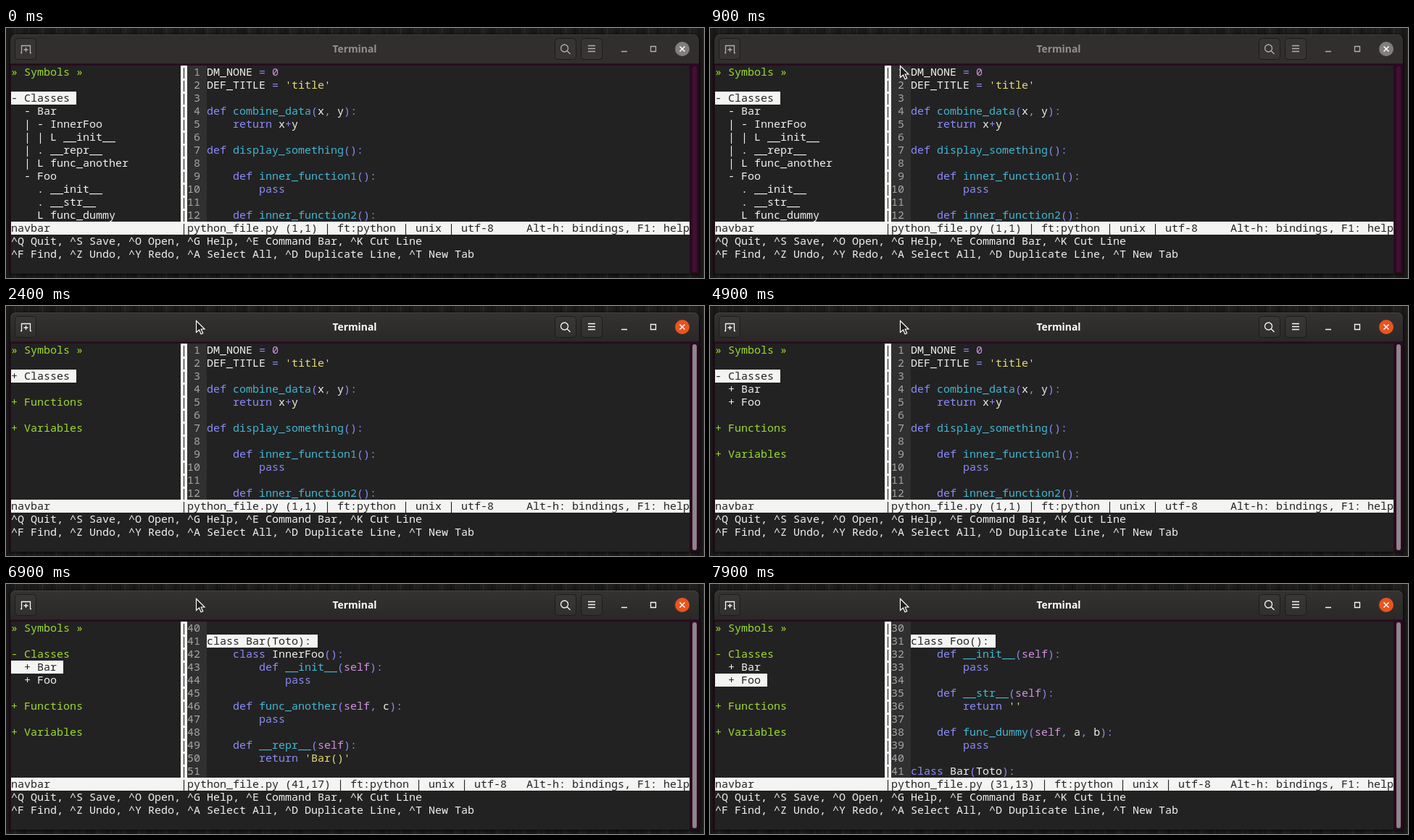
Animation of 963x346 px, one loop 8000 ms. Source, as an HTML page:

```html
<!DOCTYPE html>
<html lang="en">
<head>
<meta charset="utf-8">
<title>Terminal</title>
<style>
html, body { margin: 0; width: 100%; height: 100%; overflow: hidden; }
body {
  position: relative;
  background:
    repeating-linear-gradient(90deg, #0000 0 5px, #0003 5px 7px, #0000 7px 12px, #fff1 12px 13px, #0000 13px 19px),
    repeating-linear-gradient(91deg, #1b1a19 0 11px, #201f1e 15px 23px, #1b1a19 29px);
}
#win, #win div, svg { position: absolute; }
#win { left: 0; top: 0; width: 963px; height: 346px; }
#frame {
  left: 6px; top: 9px; width: 950px; height: 331px; border-radius: 8px 8px 0 0;
  background: #2b0a20; box-shadow: 0 1px 4px 1px #0009;
}
.bar { left: 6px; top: 9px; width: 950px; height: 41px; border-radius: 8px 8px 0 0; box-shadow: inset 0 1px #ffffff14, inset 0 -1px #1b1a1a; }
#dim { background: #302f2e; }
#lit { background: linear-gradient(#353331, #2a2827); }
#title {
  left: 381px; top: 19px; width: 200px; text-align: center;
  font: bold 13.9px/20px "Open Sans", "Noto Sans", sans-serif;
}
#screen { left: 7px; top: 52px; width: 936px; height: 288px; background: #222; }
#thumb { left: 947px; top: 53px; width: 6px; height: 285px; border-radius: 3px; }
.row {
  height: 18px; white-space: pre; color: #f0f0ee;
  font: 15px/16px "Noto Sans Mono", "DejaVu Sans Mono", monospace;
  font-variant-ligatures: none;
}
#win .inv { background: #f4f4f2; color: #222; }
.green { color: #9bdc2c; }
.num { color: #a6a6a4; }
.key { color: #8b8bfa; }
.fn { color: #42b7d3; }
.lit { color: #d491e2; }
.str { color: #e6db74; }
svg { left: 0; top: 0; }
</style>
</head>
<body>
<div id="win">
  <div id="frame"></div>
  <div class="bar" id="dim"></div>
  <div class="bar" id="lit"></div>
  <div id="title">Terminal</div>
  <div id="screen"></div>
  <div id="thumb"></div>
  <svg width="963" height="346" fill="none">
    <g fill="#ffffff08" stroke="#1d1c1b">
      <rect x="12.5" y="14.5" width="29" height="29" rx="4"/>
      <rect x="757.5" y="14.5" width="29" height="29" rx="4"/>
      <rect x="793.5" y="14.5" width="29" height="29" rx="4"/>
    </g>
    <circle id="close" cx="933" cy="29" r="10"/>
    <path d="M929.5 25.5l7 7m0-7l-7 7" stroke="#fff" stroke-width="1.5"/>
    <g id="icons" stroke-width="1.3">
      <path d="M20 34.5H21.5V24.5H33.5V34.5H35M27.5 27v6m-3-3h6"/>
      <circle cx="770.5" cy="28" r="5"/>
      <path d="M774 31.5l4.5 4.5M803 24.5h10m-10 4h10m-10 4h10M849 32.5h8M889.5 25.5h7v7h-7z"/>
    </g>
    <path id="mouse" d="M0 0V16L4 12.5L6.5 18.3L9.2 17.2L6.7 11.5H11.5Z" fill="#1c1c1c" stroke="#fff" stroke-width="1.2"/>
  </svg>
</div>
<script>
const LOOP = 8000;
const $ = id => document.getElementById(id);
const screenEl = $("screen");

function group() {
  return screenEl.appendChild(document.createElement("div"));
}

// Text on a grid of 9 x 18 px cells
function put(parent, col, row, html, cls = "", cols = 0) {
  const el = document.createElement("div");
  el.className = "row " + cls;
  el.style.left = col * 9 + "px";
  el.style.top = row * 18 + "px";
  if (cols) el.style.width = cols * 9 + "px";
  el.innerHTML = html;
  parent.append(el);
  return el;
}

function paint(line) {
  let prev = "";
  return line.replace(/'[^']*'|\w+|[^\w\s']/g, tok => {
    let cls = "";
    if (tok[0] === "'") cls = "str";
    else if (/^(def|class|return|pass)$|^\W/.test(tok)) cls = "key";
    else if (/^(self|\d+)$/.test(tok)) cls = "lit";
    else if (prev === "def") cls = "fn";
    prev = tok;
    return cls ? `<span class="${cls}">${tok}</span>` : tok;
  });
}

function nav(lines, sel) {
  const g = group();
  lines.forEach((line, i) => {
    if (i === sel) put(g, 0, i, line + " ", "inv", line.length + 1);
    else put(g, 0, i, line, /^\S/.test(line) ? "green" : "");
  });
  return g;
}

function code(first, lines, pos, sel) {
  const g = group();
  lines.forEach((line, i) => {
    put(g, 27, i, String(first + i).padStart(2), "num");
    if (i === sel) put(g, 30, i, line + " ", "inv", line.length + 1);
    else put(g, 30, i, paint(line));
  });
  put(g, 27, 12, `python_file.py (${pos}) | ft:python | unix | utf-8`, "inv");
  return g;
}

put(screenEl, 27, 0, "", "", 3).style.cssText += "height:216px;background:#303030";
put(screenEl, 0, 12, "navbar", "inv", 104);
for (let r = 0; r < 13; r++) put(screenEl, 26, r, "|", "inv", 1);
put(screenEl, 79, 12, "Alt-h: bindings, F1: help", "inv");
put(screenEl, 0, 13, "^Q Quit, ^S Save, ^O Open, ^G Help, ^E Command Bar, ^K Cut Line");
put(screenEl, 0, 14, "^F Find, ^Z Undo, ^Y Redo, ^A Select All, ^D Duplicate Line, ^T New Tab");

const head = ["» Symbols »", ""];
const tail = ["", "+ Functions", "", "+ Variables"];
const full = [...head, "- Classes", "  - Bar", "  | - InnerFoo", "  | | L __init__",
  "  | . __repr__", "  | L func_another", "  - Foo", "    . __init__", "    . __str__", "    L func_dummy"];
const short = [...head, "- Classes", "  + Bar", "  + Foo", ...tail];

const navs = [
  [0, nav(full, 2)],
  [2400, nav([...head, "+ Classes", ...tail], 2)],
  [4900, nav(short, 2)],
  [5400, nav(short, 3)],
  [7400, nav(short, 4)]
];

const codes = [
  [0, code(1, ["DM_NONE = 0", "DEF_TITLE = 'title'", "", "def combine_data(x, y):",
    "    return x+y", "", "def display_something():", "", "    def inner_function1():",
    "        pass", "", "    def inner_function2():"], "1,1")],
  [6900, code(40, ["", "class Bar(Toto):", "    class InnerFoo():", "        def __init__(self):",
    "            pass", "", "    def func_another(self, c):", "        pass", "",
    "    def __repr__(self):", "        return 'Bar()'", ""], "41,17", 1)],
  [7900, code(30, ["", "class Foo():", "    def __init__(self):", "        pass", "",
    "    def __str__(self):", "        return ''", "", "    def func_dummy(self, a, b):",
    "        pass", "", "class Bar(Toto):"], "31,13", 1)]
];

// Pointer tip, one entry per 100 ms from 500 ms on
const path = [[269, 175], [268, 140], [266, 103], [264, 72], [262, 52], [262, 41], [262, 32], [262, 25], [262, 20]];

const at = (steps, t) => steps.filter(s => s[0] <= t).pop()[1];
const show = (steps, t) => {
  const now = at(steps, t);
  for (const [, el] of steps) el.style.visibility = el === now ? "visible" : "hidden";
};
const mix = (a, b, p) => `rgb(${a.map((v, i) => Math.round(v + (b[i] - v) * p))})`;

function draw(t) {
  show(navs, t);
  show(codes, t);

  const step = Math.floor((t - 500) / 100);
  const [x, y] = path[Math.max(0, Math.min(step, path.length - 1))];
  $("mouse").style.visibility = step < 0 ? "hidden" : "visible";
  $("mouse").setAttribute("transform", `translate(${x + 0.5} ${y + 0.5})`);

  const p = at([[0, 0], [1500, 0.35], [1600, 0.8], [1700, 1]], t);
  $("lit").style.opacity = p;
  $("title").style.color = mix([146, 144, 142], [255, 255, 255], p);
  $("icons").style.stroke = mix([178, 176, 174], [248, 248, 247], p);
  $("close").style.fill = mix([128, 127, 126], [233, 84, 32], p);
  $("thumb").style.background = mix([66, 16, 52], [141, 133, 138], p);
}

function tick() {
  draw(performance.now() % LOOP);
  requestAnimationFrame(tick);
}
tick();
</script>
</body>
</html>
```
